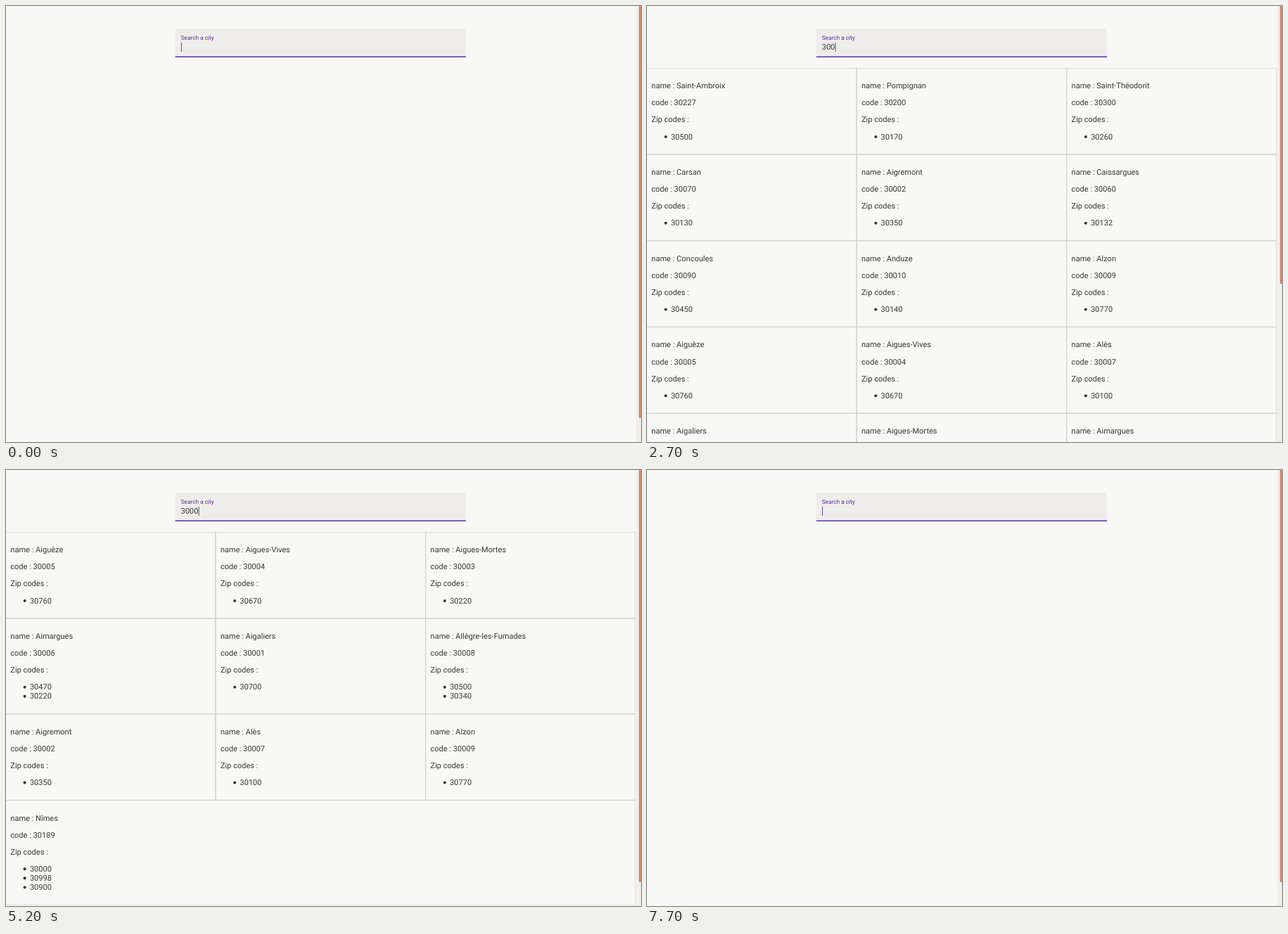
Animation, 903 px wide and 620 px high, one loop 8000 ms. Source, as an HTML page with a canvas:

```html
<!DOCTYPE html>
<html lang="en">
<head>
<meta charset="utf-8">
<title>City search</title>
<style>
  html, body { margin: 0; width: 100%; height: 100%; overflow: hidden; background: #f8f8f6; }
  canvas { display: block; }
</style>
</head>
<body>
<canvas id="stage" width="903" height="620"></canvas>
<script>
const ctx = document.getElementById('stage').getContext('2d');
const LOOP = 8000;
const SCALE = 0.6896;              // page zoom: the list is laid out in 16px text units
const FONT = 'Roboto, sans-serif';
const INK = '#363635', PURPLE = '#5b2c9a', UNDERLINE = '#4c2c8c', CARET = '#4f4066', LINE = '#cbcbca';
const LIST = { x: -0.6, y: 88.2, column: 298.63 / SCALE };

// name | code | zip codes
const cities = new Map(`Tournon-Saint-Martin|36224|36220
Saint-Malo-de-Phily|35289|35480
Saint-Ambroix|30227|30500
Saint-Maurice-en-Trièves|38424|38930
Sainte-Christie|32368|32390
Riocaud|33354|33220
Malicornay|36111|36340
Labescau|33212|33690
Crolles|38140|38920
Alignan-du-Vent|34009|34290
Châteaubourg|35068|35220
Langon|33227|33210
Moissieu-sur-Dolon||
Magnan||
Saint-Philippe-d'Aiguille||
Aiguèze|30005|30760
Aigues-Vives|30004|30670
Aigues-Mortes|30003|30220
Aimargues|30006|30470 30220
Aigaliers|30001|30700
Allègre-les-Fumades|30008|30500 30340
Aigremont|30002|30350
Alès|30007|30100
Alzon|30009|30770
Nîmes|30189|30000 30998 30900
Pompignan|30200|30170
Caissargues|30060|30132
Carsan|30070|30130
Saint-Théodorit|30300|30260
Anduze|30010|30140
Concoules|30090|30450`.split('\n').map(row => {
  const [name, code, zips] = row.split('|');
  return [name, { name, code, zips: zips.split(' ') }];
}));
const all = [...cities.values()];

const pick = text => text.split(' ').map(name => cities.get(name));
const results = {
  '': { cities: [], thumb: 586 },
  '3': { cities: all.slice(0, 15), thumb: 397 },
  '30': {
    cities: pick('Saint-Ambroix Pompignan Saint-Théodorit Carsan Aigremont Caissargues Concoules Anduze Alzon Aiguèze Aigues-Vives Alès Aigaliers Aigues-Mortes Aimargues'),
    thumb: 395
  },
  '300': {
    cities: pick('Caissargues Aiguèze Carsan Anduze Aigues-Vives Concoules Aigues-Mortes Aigremont Aigaliers Alès Alzon Aimargues Allègre-les-Fumades Nîmes'),
    thumb: 390
  },
  '3000': { cities: all.slice(15, 25), thumb: 586 },
  '30000': {
    cities: pick('Nîmes Aiguèze Pompignan Caissargues Aigues-Vives Carsan Saint-Théodorit Anduze Aigues-Mortes Concoules Aimargues Aigaliers'),
    thumb: 375
  }
};

// Results trail the typed text: [time, typed text, query shown, caret visible]
const steps = [
  [0, '', '', true],
  [500, '', '', false],
  [1700, '', '', true],
  [2100, '3', '', true],
  [2300, '3', '3', true],
  [2400, '30', '3', true],
  [2600, '30', '30', true],
  [2700, '300', '30', true],
  [2800, '3000', '30', true],
  [2900, '30000', '300', true],
  [3300, '30000', '3000', true],
  [3400, '30000', '30000', true],
  [4100, '30000', '30000', false],
  [5100, '3000', '30000', true],
  [5200, '3000', '3000', true],
  [5300, '300', '3000', true],
  [5400, '300', '300', true],
  [5500, '30', '300', true],
  [5600, '30', '30', true],
  [5700, '3', '3', true],
  [5800, '', '', true],
  [6500, '', '', false],
  [7700, '', '', true]
];

function rect(color, x, y, w, h) {
  ctx.fillStyle = color;
  ctx.fillRect(x, y, w, h);
}

function text(str, x, y, size = 16, color = INK) {
  ctx.font = `${size}px ${FONT}`;
  ctx.fillStyle = color;
  ctx.fillText(str, x, y);
}

function drawField(typed, caret) {
  ctx.fillStyle = '#eeedeb';
  ctx.beginPath();
  ctx.roundRect(240.6, 32.6, 413.4, 40, [2.8, 2.8, 0, 0]);
  ctx.fill();
  rect(UNDERLINE, 240.6, 71.6, 413.4, 1.4);
  text('Search a city', 248.7, 47.6, 12 * SCALE, PURPLE);
  text(typed, 248.7, 62.3, 16 * SCALE);
  if (caret) rect(CARET, 249 + ctx.measureText(typed).width, 52, 0.9, 13);
}

function drawCard(city, x, y, w, h) {
  ctx.strokeStyle = LINE;
  ctx.strokeRect(x + 0.5, y + 0.5, w - 1, h - 1);
  const left = x + 10;
  text('name : ' + city.name, left, y + 42);
  text('code : ' + city.code, left, y + 77);
  text('Zip codes :', left, y + 112);
  city.zips.forEach((zip, i) => {
    const base = y + 147 + i * 19;
    text(zip, left + 40, base);
    ctx.beginPath();
    ctx.arc(left + 29.5, base - 5.2, 3, 0, 2 * Math.PI);
    ctx.fill();
  });
}

function drawList(items) {
  ctx.save();
  ctx.translate(LIST.x, LIST.y);
  ctx.scale(SCALE, SCALE);
  let y = 0;
  for (let i = 0; i < items.length; i += 3) {
    const row = items.slice(i, i + 3);
    const width = LIST.column * 3 / row.length;
    const height = 159 + 19 * Math.max(...row.map(city => city.zips.length));
    row.forEach((city, col) => drawCard(city, col * width, y, width, height));
    y += height;
  }
  ctx.restore();
}

function frame() {
  const t = performance.now() % LOOP;
  const [, typed, query, caret] = steps.findLast(step => step[0] <= t);
  const shown = results[query];
  rect('#f8f8f6', 0, 0, 903, 620);
  drawField(typed, caret);
  drawList(shown.cities);
  rect('#f0efec', 896, 0, 7, 620);
  rect('#d9886c', 900, 0, 3, shown.thumb);
  requestAnimationFrame(frame);
}

ctx.textRendering = 'geometricPrecision';
frame();
</script>
</body>
</html>
```
